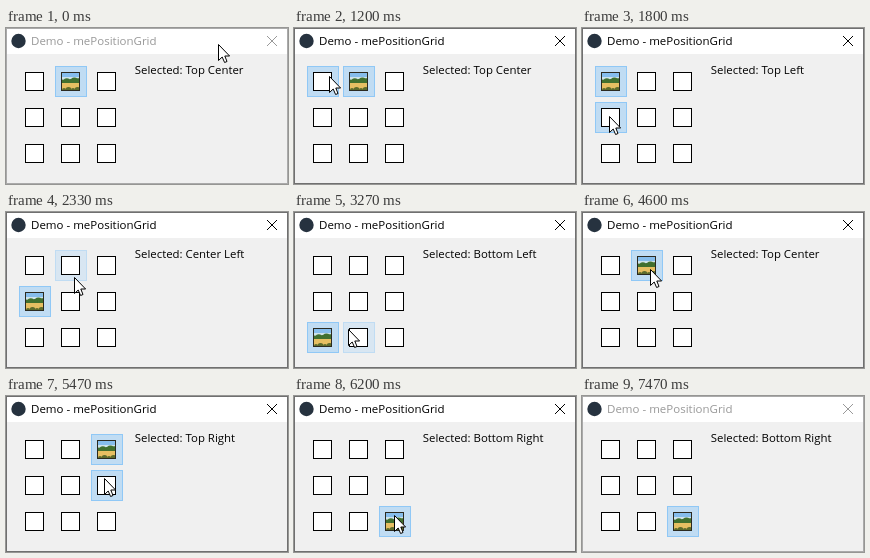
Write an HTML page with a canvas that moves like this. It is 282 by 156 pixels and loops after 7.54 s.

```html
<!DOCTYPE html>
<html lang="en">
<head>
<meta charset="utf-8">
<title>Position grid demo</title>
<style>
  html, body { margin: 0; width: 100%; height: 100%; overflow: hidden; background: #f0f0f0; }
  canvas { display: block; width: 100vw; height: 100vh; }
</style>
</head>
<body>
<canvas id="stage" width="282" height="156"></canvas>
<script>
const ctx = document.getElementById('stage').getContext('2d');
const LOOP = 7540;
const ROWS = ['Top', 'Center', 'Bottom'];
const COLS = ['Left', 'Center', 'Right'];
const GRID = { x: 13, y: 38, pitch: 36, width: 32, height: 31 };
const ARROW = new Path2D('M.5 .5V16.5L4.2 13L6.6 18.5L9 17.5L6.8 12H11.6Z');

// Times are in ticks of 1/15 s.
const ACTIVE = { from: 18, to: 112 };
const HOLD = 2;

// The cursor glides between stops; a stay of at least HOLD ends in a click.
const stop = (arrive, leave, x, y) => ({ arrive, leave, x, y });
const STOPS = [
  stop(4, 4, 212, 16),
  stop(14, 20, 35, 48),
  stop(26, 28, 27, 88),
  stop(35, 36, 68, 65),
  stop(44, 47, 30, 121),
  stop(49, 55, 54, 117),
  stop(57, 62, 65, 93),
  stop(65, 69, 68, 57),
  stop(72, 74, 103, 57),
  stop(78, 84, 98, 82),
  stop(89, 92, 100, 119),
  stop(97, 97, 100, 120),
  stop(101, 101, 117, 157)
];
const CLICKS = STOPS
  .filter(({ arrive, leave }) => leave - arrive >= HOLD)
  .map(({ leave, x, y }) => ({ press: leave - HOLD, release: leave, cell: cellAt(x, y) }));

function cellAt(x, y) {
  const col = Math.floor((x - GRID.x) / GRID.pitch);
  const row = Math.floor((y - GRID.y) / GRID.pitch);
  const inside = row in ROWS && col in COLS
    && (x - GRID.x) % GRID.pitch < GRID.width
    && (y - GRID.y) % GRID.pitch < GRID.height;
  return inside ? row * 3 + col : -1;
}

function cursorAt(tick) {
  const next = STOPS.findIndex(({ leave }) => tick < leave);
  if (next === 0) return STOPS[0];
  if (next < 0) return STOPS[STOPS.length - 1];
  const from = STOPS[next - 1];
  const to = STOPS[next];
  const u = Math.min(1, (tick - from.leave) / (to.arrive - from.leave));
  const ease = u * u * (3 - 2 * u);
  return {
    x: Math.round(from.x + (to.x - from.x) * ease),
    y: Math.round(from.y + (to.y - from.y) * ease)
  };
}

function rect(x, y, w, h, fill, line) {
  ctx.fillStyle = line || fill;
  ctx.fillRect(x, y, w, h);
  if (line) {
    ctx.fillStyle = fill;
    ctx.fillRect(x + 1, y + 1, w - 2, h - 2);
  }
}

function disc(x, y, radius, fill) {
  ctx.fillStyle = fill;
  ctx.beginPath();
  ctx.arc(x, y, radius, 0, 7);
  ctx.fill();
}

function text(string, x, y, size, fill) {
  ctx.font = `${size}px "Open Sans", "Noto Sans", sans-serif`;
  ctx.fillStyle = fill;
  ctx.fillText(string, x, y);
}

function drawLandscape(x, y) {
  ctx.save();
  ctx.translate(x, y);
  rect(0, 0, 19, 19, '#86bdec', '#2b2a20');
  ctx.beginPath();
  ctx.rect(1, 1, 17, 17);
  ctx.clip();
  rect(1, 5, 17, 4, '#cfe3ea');
  for (let i = 0; i < 5; i++) disc(2 + i * 3.8, 9.5, 2 + i % 2 + i * 0.3, '#41702f');
  rect(1, 11, 17, 7, '#e6bf62');
  for (let i = 0; i < 4; i++) disc(3 + i * 4.5, 18, 2 + i % 2, '#5d6c2c');
  ctx.restore();
}

function drawCell(cell, selected, pressed, hovered) {
  const x = GRID.x + cell % 3 * GRID.pitch;
  const y = GRID.y + Math.floor(cell / 3) * GRID.pitch;
  if (selected || pressed) rect(x, y, GRID.width, GRID.height, '#c0dcf3', '#90c8f6');
  else if (hovered) rect(x, y, GRID.width, GRID.height, '#d8e6f2', '#c0dcf3');
  if (selected) drawLandscape(x + 6, y + 6);
  else rect(x + 6, y + 6, 19, 19, '#fff', '#000');
}

function drawWindow(active) {
  const ink = active ? '#000' : '#999';
  rect(0, 0, 282, 156, '#f0f0f0', active ? '#707070' : '#aaa');
  rect(1, 1, 280, 25, '#fff');
  disc(12.5, 13, 7.2, '#26323f');
  text('Demo - mePositionGrid', 25, 17, 11.5, ink);
  ctx.strokeStyle = ink;
  ctx.stroke(new Path2D('M261 8L271 18M271 8L261 18'));
}

function drawCursor({ x, y }) {
  ctx.save();
  ctx.translate(x, y);
  ctx.fillStyle = '#fff';
  ctx.strokeStyle = '#000';
  ctx.fill(ARROW);
  ctx.stroke(ARROW);
  ctx.restore();
}

function labelOf(cell) {
  const names = [ROWS[Math.floor(cell / 3)], COLS[cell % 3]];
  return [...new Set(names)].join(' ');
}

function draw(tick) {
  const cursor = cursorAt(tick);
  const hovered = cellAt(cursor.x, cursor.y);
  const lastClick = CLICKS.filter(({ release }) => release <= tick).pop();
  const selected = lastClick ? lastClick.cell : 1;
  const current = CLICKS.find(({ press, release }) => press <= tick && tick < release);

  drawWindow(tick >= ACTIVE.from && tick < ACTIVE.to);
  for (let cell = 0; cell < 9; cell++) {
    drawCell(cell, cell === selected, current?.cell === cell, cell === hovered);
  }
  text(`Selected: ${labelOf(selected)}`, 128.8, 46, 11.4, '#000');
  drawCursor(cursor);
}

const start = performance.now();
function frame() {
  const time = (performance.now() - start) % LOOP;
  draw(Math.floor((time + 4) * 0.015));
  requestAnimationFrame(frame);
}
frame();
</script>
</body>
</html>
```
